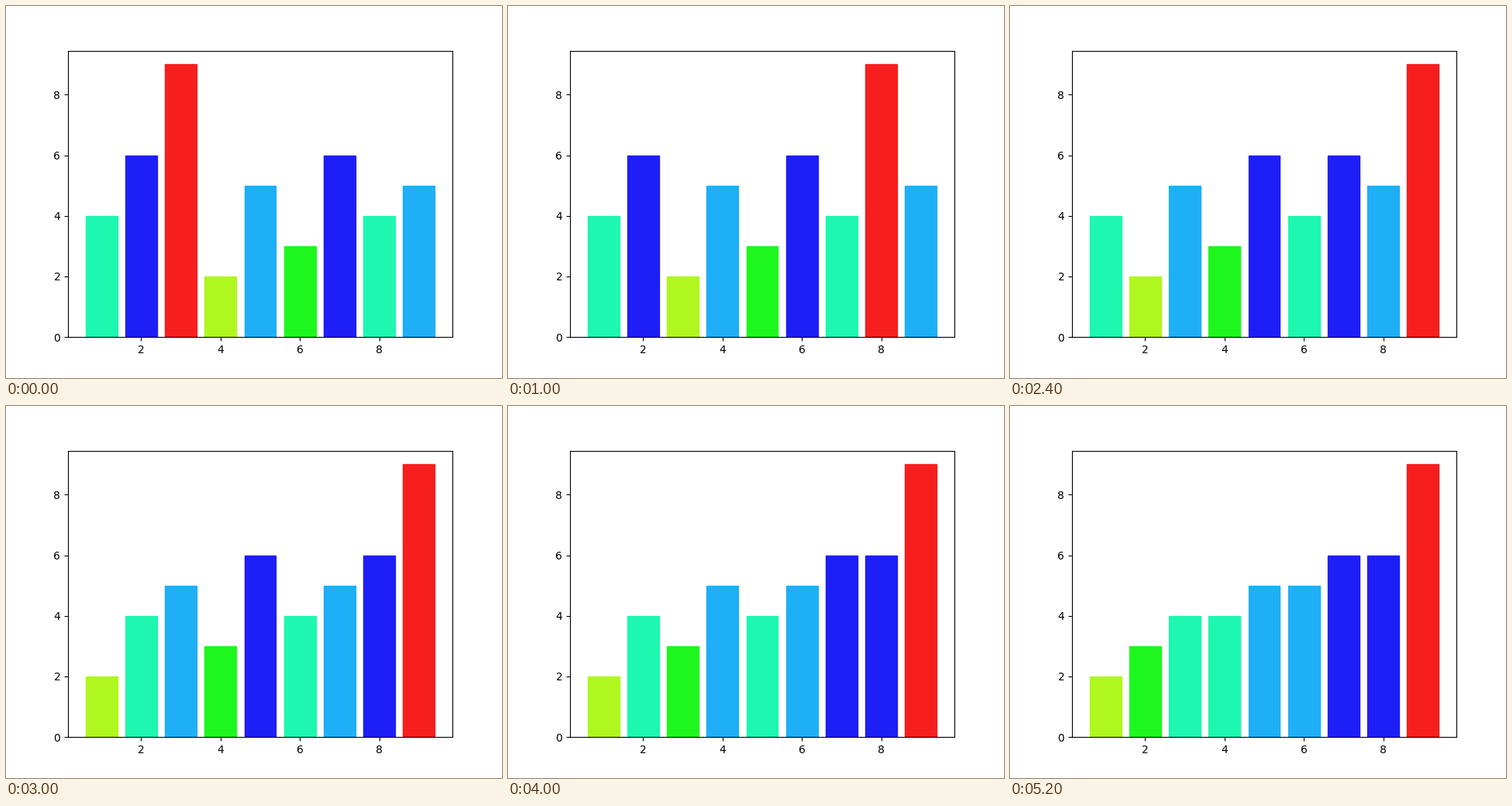
A matplotlib script that plays this animation: 640x480 px, repeating every 8000 ms.

```python
import colorsys

import matplotlib.pyplot as plt
from matplotlib.animation import FuncAnimation

VALUES = [4, 6, 9, 2, 5, 3, 6, 4, 5]
N = len(VALUES)
STEP_MS = 200
FRAMES = 40


def value_color(value):
    return colorsys.hsv_to_rgb(value / max(VALUES), 0.88, 0.97)


def sorted_after(steps):
    """Bubble sort after the given number of comparisons, full passes."""
    data = VALUES.copy()
    for k in range(steps):
        j = k % (N - 1)
        if data[j] > data[j + 1]:
            data[j], data[j + 1] = data[j + 1], data[j]
    return data


def update(frame):
    # the loop opens on the second comparison
    for bar, value in zip(bars, sorted_after(frame + 2)):
        bar.set_height(value)
        bar.set_color(value_color(value))
    return bars


fig, ax = plt.subplots(figsize=(6.4, 4.8), dpi=100)
bars = ax.bar(range(1, N + 1), VALUES)
update(0)

anim = FuncAnimation(fig, update, frames=FRAMES, interval=STEP_MS,
                     init_func=lambda: update(0), repeat=True)
plt.show()
```
